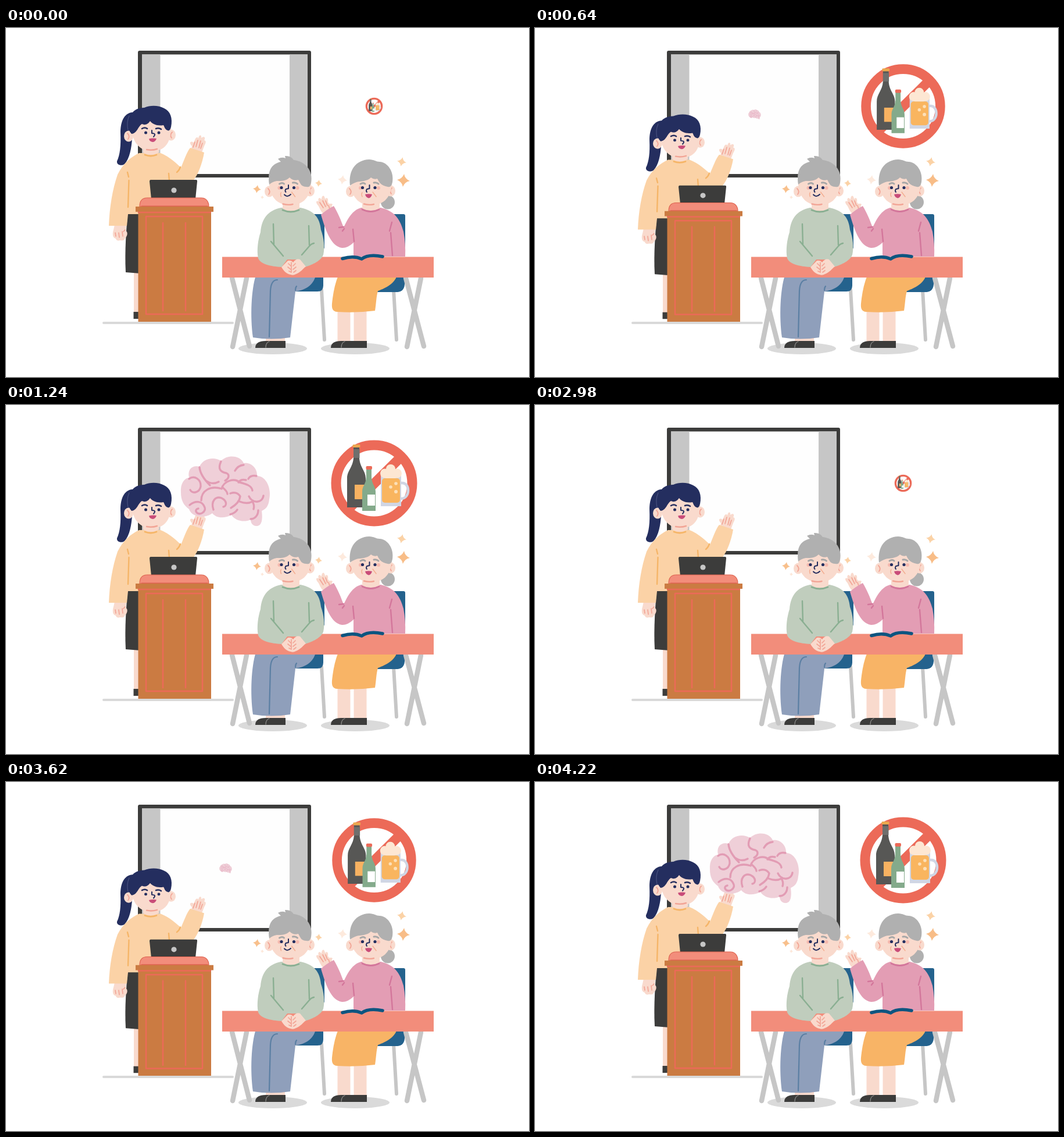
These frames come from a looping animation (900 by 600 pixels, 6000 ms). An HTML page with a canvas:

```html
<!DOCTYPE html>
<html lang="en">
<head>
<meta charset="utf-8">
<title>Health class</title>
<style>
html, body { margin: 0; width: 100%; height: 100%; overflow: hidden; background: #fff; }
canvas { display: block; width: 900px; height: 600px; }
</style>
</head>
<body>
<canvas id="stage" width="900" height="600"></canvas>
<script>
const ctx = document.getElementById('stage').getContext('2d');
const SKIN = '#f9dacd', CREASE = '#f2a596', NAVY = '#242e5f', DARK = '#3c3c3b', GREY = '#c6c6c6';
const HAIR = '#b0b0b0', CORAL = '#f28d7b', RED = '#ec6a58', WOOD = '#cb7b42', BLUE = '#24628d';
const ORANGE = '#f8b466', PEACH = '#fbd2a6', GREEN = '#c0cdbd', PINK = '#e39db4';

const LOOP = 6000, SECOND = 2980, ACTIVE = 1240, GROW = 720, BRAIN_START = 520;

const paths = new Map();
function path(d) {
  if (!paths.has(d)) paths.set(d, new Path2D(d));
  return paths.get(d);
}
function fill(color, d) {
  ctx.fillStyle = color;
  ctx.fill(path(d));
}
function line(color, width, d) {
  ctx.strokeStyle = color;
  ctx.lineWidth = width;
  ctx.stroke(path(d));
}
function rect(color, x, y, w, h, r = 0) {
  ctx.fillStyle = color;
  ctx.beginPath();
  ctx.roundRect(x, y, w, h, r);
  ctx.fill();
}
function oval(color, x, y, rx, ry = rx) {
  ctx.fillStyle = color;
  ctx.beginPath();
  ctx.ellipse(x, y, rx, ry, 0, 0, Math.PI * 2);
  ctx.fill();
}
function scaled(x, y, sx, sy, draw) {
  ctx.save();
  ctx.translate(x, y);
  ctx.scale(sx, sy);
  ctx.translate(-x, -y);
  draw();
  ctx.restore();
}
function ear(x, y, side) {
  oval(SKIN, x, y, 8, 9.5);
  line(CREASE, 1.8, `M${x + side * 2} ${y - 5}q${-side * 5} 5 ${-side} 10`);
}
function sparkle(x, y, r, color, turn = 0.15) {
  ctx.save();
  ctx.translate(x, y);
  ctx.rotate(turn);
  ctx.scale(r, r);
  fill(color, 'M0-1Q.18-.27 1 0Q.27.18 0 1Q-.18.27-1 0Q-.27-.18 0-1Z');
  ctx.restore();
}

function board() {
  rect(DARK, 227, 39, 298, 218, 3);
  rect('#fefefe', 234, 45.5, 285, 205.5);
  rect(GREY, 234, 45.5, 31.5, 205.5);
  rect(GREY, 488, 45.5, 31, 205.5);
}

function teacher() {
  // Legs and skirt
  rect(SKIN, 220, 418, 12, 72);
  rect(DARK, 219.5, 488, 12, 12);
  fill(DARK, 'M210 312H232V422L206 420C204 384 207 344 210 312Z');
  // Ponytail
  fill(NAVY, 'M218 145C202 146 197 163 197 180C198 203 196 218 191 229C190 235 198 238 204 234C213 224 216 206 217 190L226 160Z');
  // Hands
  fill(SKIN, 'M187 338H207L206 348C211 352 208 359 205 361C203 367 198 365 196 365C191 367 189 363 189 362C183 361 183 353 185 347Z');
  line(CREASE, 1.7, 'M188 352L189 358M194 352L195 360M200 350L201 358M205 347L202 350');
  fill(SKIN, 'M318 210L320 203C314 197 318 193 323 197L326 190C329 186 331 189 331 190C332 183 337 183 336 189C341 185 344 188 341 193C346 194 343 199 341 203L337 214Z');
  line(CREASE, 1.7, 'M325 196L322 205M330 193L327 204M335 194L332 206M338 198L335 207');
  // Sweater
  fill(PEACH, 'M229 215H266C281 221 295 234 301 240C306 229 311 213 317 206L341 214C338 232 331 252 321 264L298 270V320H210L208 340H177C178 309 183 278 192 252C201 233 216 221 229 215Z');
  line('#f5b568', 2.4, 'M209 248L211 256M211.500 262L210 308M280 250L281 263M300 239Q298 245 294 248');
  fill(SKIN, 'M236 202H263V214Q249 222 236 214Z');
  line('#f5b568', 2.8, 'M239 218Q249 222 259 218');
  // Head
  ear(211, 186, -1);
  ear(284, 184, 1);
  fill(SKIN, 'M216 160H283C286 188 280 211 251 212C225 211 214 190 216 160Z');
  line(CREASE, 2.4, 'M242 209Q251 211 260 208');
  fill(NAVY, 'M213 178C207 151 219 137 238 137C249 132 263 133 272 138C283 143 287 155 284 170Q282 178 278 176C273 174 273 170 271 167C260 169 252 165 248 160C243 167 238 167 234 165C227 169 226 181 216 182Z');
  line('#48517f', 1.2, 'M212 151Q207 162 210 176');
  line(NAVY, 2.6, 'M234 173Q239 170 243 173M258 173Q263 171 267 174');
  oval(NAVY, 240.5, 180, 2.5);
  oval(NAVY, 263, 180, 2.5);
  line(NAVY, 2, 'M251 176V181Q257 181 256 184L254 187');
  fill('#c94c79', 'M246 190.500Q252 189 259 190Q257 196 252 196Q247 195 246 190.500Z');
}

function podium() {
  fill(DARK, 'M249 261H327Q329.500 261 329 264L326 294H250L247 264Q247 261 249 261Z');
  oval(GREY, 289, 279, 4.6);
  fill(CORAL, 'M230 307C230 297 235 292 243 292H336C344 292 349 298 349 307Z');
  line('#de6350', 1.2, 'M230 307C230 297 235 292 243 292H336C344 292 349 298 349 307ZM233 306H347');
  rect(WOOD, 227.5, 310, 125.5, 195);
  rect(WOOD, 223, 307, 134, 9);
  line(RED, 2.5, 'M228 317H352M241 324H338V492H241ZM270 335V486M309 335V486');
}

function brain() {
  fill('#efcfd8', 'M301 150C300 136 306 126 315 125C312 111 320 103 333 106C339 92 357 88 370 96C382 84 404 87 409 100C422 98 433 109 432 122C449 122 457 146 453 162C452 174 447 179 440 182C442 198 440 208 431 208C424 208 421 202 421 197C409 203 393 198 388 189C374 196 361 194 355 186C344 195 320 194 315 179C305 172 301 163 301 150Z');
  const ink = '#e29cb4';
  line(ink, 3.4, 'M315 127C324 120 336 128 335 140C333 151 321 153 317 146M333 107C334 119 342 129 351 138M344 130Q355 138 366 132');
  line(ink, 3.4, 'M370 97C364 110 369 115 379 117C386 120 383 127 377 130M336 164C336 147 352 138 371 144C375 130 393 125 402 133C414 136 423 139 424 147M373 142C379 147 381 150 381 153M400 133Q404 127 413 129');
  line(ink, 3.4, 'M394 113Q399 104 409 103M417 127Q421 120 431 122M418 157C424 170 441 169 443 156M386 152Q397 148 403 157C402 167 392 174 387 177M402 166Q415 171 424 166Q428 172 426 179');
  line(ink, 3.4, 'M357 180C352 165 361 156 371 160C381 165 380 174 374 175M316 172C326 164 337 165 341 174C347 184 331 192 327 183Q326 179 331 178M386 188Q394 186 398 180M421 196C428 196 434 190 434 181');
}

function sign() {
  ctx.lineCap = 'butt';
  line(RED, 17, 'M568 134.500A65.500 65.500 0 1 1 699 134.500A65.500 65.500 0 1 1 568 134.500ZM586 182L681 88');
  ctx.lineCap = 'round';
  // Wine bottle
  fill('#575755', 'M598 72H608V91C609 108 619 113 619 126V176H587V126C587 113 597 107 598 91Z');
  rect('#6f6f6d', 598, 76, 10.5, 15);
  rect('#eca84f', 596.5, 68, 13, 5, 1.5);
  rect('#f8b261', 600, 137, 19, 25);
  // Green bottle
  fill('#84aa8b', 'M620 110H629V124C630 138 636 139 636 149V182H613V149C613 139 619 137 620 124Z');
  rect(RED, 619.5, 105, 10.5, 6, 2);
  rect('#fff', 622, 154, 13, 19);
  // Mug
  line('#d0d6e4', 4.5, 'M680 134C696 132 696 161 680 161');
  rect('#d0d6e4', 645, 118, 35, 56);
  rect('#f9b55f', 647, 126, 31, 42, 5);
  oval('#fde7d3', 652, 117.5, 8);
  oval('#fde7d3', 662, 110, 8);
  oval('#fde7d3', 673, 117.5, 8);
  rect('#fde7d3', 651, 113, 22, 13, 4);
  oval('#fde0b8', 662, 141, 2.8);
  oval('#fde0b8', 671, 135, 2.8);
  oval('#fde0b8', 671, 149, 3);
}

function furniture() {
  oval('#dadada', 459, 551, 59, 10);
  oval('#dadada', 601, 551, 59, 10);
  line('#d9d9d9', 4, 'M168 507H390');
  line(GREY, 6, 'M543 450L548 536M667 450L672 536');
  rect(BLUE, 520, 320, 28, 60, 3);
  rect(BLUE, 655, 320, 32, 60, 3);
  fill(BLUE, 'M490 425H546V443Q546 453 536 453H490ZM630 425H686V441Q685 453 674 454H630Z');
  line(GREY, 8.5, 'M389 430L419 547M414 430L390 548M688 430L719 547M714 430L690 548');
}

function shoes(x) {
  fill(DARK, `M${x} 550Q${x} 538 ${x + 18} 538H${x + 52}V550Z`);
  line('#8b8b89', 1.3, `M${x + 18} 549Q${x + 18} 541 ${x + 24} 539`);
}

function agedFace(x) {
  line('#a7a7a7', 3, `M${x - 14} 268Q${x - 9} 265 ${x - 6} 268M${x + 9} 266Q${x + 14} 265 ${x + 17} 268`);
  oval('#f5b9ae', x - 14, 275, 3);
  oval('#f5b9ae', x + 17, 275, 3);
  oval(NAVY, x - 10.5, 274.5, 2.6);
  oval(NAVY, x + 11, 274.5, 2.6);
  line(NAVY, 2, `M${x + 1.5} 270V276L${x - 3} 277Q${x - 5} 280 ${x - 3} 282`);
  line('#f4ae91', 1.5, `M${x - 11} 283Q${x - 13} 285 ${x - 11} 290M${x + 7} 282L${x + 13} 290`);
  line(CREASE, 2.4, `M${x - 8} 302.500Q${x + 1} 305 ${x + 9} 303`);
}

function manLegs() {
  rect(SKIN, 447, 528, 33, 12);
  shoes(429);
  fill('#8f9fbb', 'M430 425H533C529 444 512 451 498 453L489 532Q456 537 425 532C420 496 422 450 430 425Z');
  line('#5b7fa3', 2.2, 'M453 531L455 452Q456 433 467 433M498 451Q498 446 500 444');
}

function man() {
  fill(GREEN, 'M473 309H507C531 314 540 327 542 347C547 361 549 377 546 390C541 402 524 408 514 411L503 398H484L474 411C456 410 438 406 434 396C431 382 434 363 438 351C440 328 450 314 473 309Z');
  line('#8aaf92', 2.4, 'M460 337L461 373M456 367L477 392M521 340L522 373M530 370Q525 371 522 375L509 390');
  fill(SKIN, 'M476 298H505V310Q490 319 476 310Z');
  line('#8aaf92', 2.8, 'M476 313Q490 319 504 313');
  ear(453, 281, -1);
  ear(523, 280, 1);
  fill(SKIN, 'M453 255H525C527 284 517 304 489 305C461 304 451 284 453 255Z');
  fill(HAIR, 'M453 269C450 247 455 234 473 230L468 225Q475 221 481 224L480 220Q490 219 495 227C515 229 529 245 525 266Q523 275 517 273C508 273 507 268 503 261C497 263 492 261 488 257C481 264 472 263 466 263Q459 264 453 269Z');
  agedFace(484.500);
  line(NAVY, 2, 'M479 286.500Q484 292 490 286');
}

function womanLegs() {
  rect(SKIN, 570.5, 480, 22, 60);
  rect(SKIN, 598.5, 480, 22, 60);
  shoes(559);
  rect(DARK, 606, 538, 15, 12);
  fill(ORANGE, 'M572 425H673C668 442 648 449 640 452C637 462 637 475 635 486Q604 490 570 488C558 487 561 475 562 465Q565 442 572 425Z');
}

function woman() {
  oval(HAIR, 657, 299.5, 12);
  fill(SKIN, 'M546 319C541 315 540 309 537 305C532 299 534 296 538 298C536 292 540 290 543 295C543 287 548 286 549 294C553 290 555 294 554 299C556 305 559 300 562 303C560 306 560 310 564 314Z');
  line(CREASE, 1.7, 'M540 300L546 309M545 297L550 307M550 297L553 305M555 305L557 311');
  fill(PINK, 'M611 309H645C671 315 679 332 684 350Q688 371 687 393H598V369Q587 379 578 378C559 375 550 348 542 321Q552 312 564 306C571 317 577 332 581 343C588 328 596 313 611 309Z');
  line('#d3769b', 2.4, 'M597 346L599 367M573 343L581 342M582 345L579 349M664 334L660 349M662 352L665 391');
  fill(SKIN, 'M613 298H643V310Q628 319 613 310Z');
  line('#d3769b', 2.8, 'M613 312Q628 319 642 312');
  ear(593, 281, -1);
  ear(662, 280, 1);
  fill(SKIN, 'M593 255H664C666 284 656 304 628 305C602 304 591 284 593 255Z');
  fill(HAIR, 'M592 271C589 244 602 227 625 226C633 226 637 230 643 230C657 231 668 247 665 265Q663 275 657 273C645 271 642 265 639 259Q633 261 628 257C622 264 610 263 603 265Q595 268 592 271Z');
  agedFace(624);
  fill('#c94c79', 'M618 286Q624 284.500 630 286Q628 292 624 292.500Q619 291 618 286Z');
}

function table() {
  rect(CORAL, 372, 393.5, 364, 35.500);
}

function tableTop() {
  fill(SKIN, 'M474 411L485 400Q491 399 494 403Q500 395 506 398L516 410C511 414 507 420 499 423Q494 426 490 424C483 423 478 418 474 411Z');
  line(CREASE, 1.7, 'M491 403V419M486 405L490 409M485 411L490 415M487 418L491 420M498 405L494 409M499 411L494 415M499 417L495 420');
  line('#0d5580', 5.5, 'M579 396.500Q598 391 612 397Q624 388 648 393');
}

function sparkles() {
  sparkle(432, 277, 7, '#f8c08c');
  sparkle(538, 267, 6, PEACH);
  sparkle(441, 291, 3, '#fde8da');
  sparkle(579, 261, 8, '#fdeadd');
  sparkle(681, 230, 8, PEACH, 0.2);
  sparkle(684, 262, 11, '#f8bd87', 0.1);
}

// Eased growth from a small starting scale to full size
function grow(t, from) {
  const p = Math.min(1, Math.max(0, t / GROW));
  return from + (1 - from) * (1 - Math.cos(Math.PI * p)) / 2;
}

function render(time) {
  const loop = Math.floor((time % LOOP) / 20) * 20;
  const t = Math.min(ACTIVE, loop < SECOND ? loop : loop - SECOND);
  const bob = 1 - Math.abs(t * 2 / ACTIVE - 1);
  const signScale = grow(t, 0.2);

  ctx.fillStyle = '#fff';
  ctx.fillRect(0, 0, 900, 600);
  ctx.lineCap = ctx.lineJoin = 'round';

  board();
  furniture();
  scaled(290, 505, 1, 1 - 0.041 * bob, () => { teacher(); podium(); });
  if (t >= BRAIN_START) {
    const s = grow(t - BRAIN_START, 0.08);
    scaled(378, 148.5, s, s, brain);
  }
  scaled(633.5, 134.5, signScale, signScale, sign);
  manLegs();
  womanLegs();
  table();
  woman();
  man();
  tableTop();
  sparkles();
}

const start = performance.now();
function tick() {
  render(performance.now() - start);
  requestAnimationFrame(tick);
}
tick();
</script>
</body>
</html>
```
